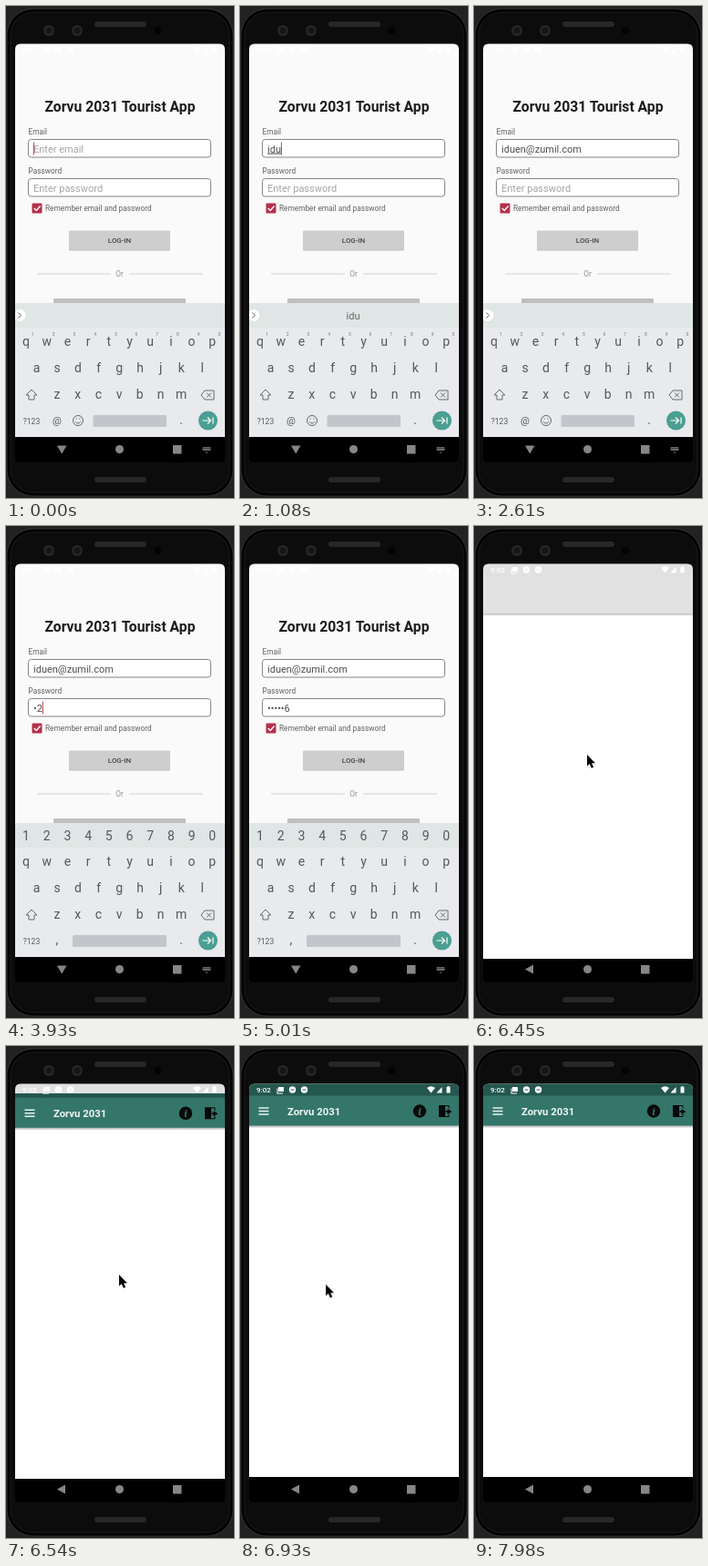
These frames come from a looping animation (250x540 px, 8 s). An HTML page:

```html
<!DOCTYPE html>
<html lang="en">
<head>
<meta charset="utf-8">
<title>Phone login</title>
<style>
  html, body { margin: 0; height: 100%; overflow: hidden; background: #222; }
  svg { display: block; width: 100vw; height: 100vh; font-family: Roboto, sans-serif; }
  .mid { text-anchor: middle; }
  .label { font-size: 8.3px; fill: #626262; }
  .field { fill: #fff; stroke: #858585; }
  .entry { font-size: 11px; fill: #505050; }
  .key { font-size: 14px; fill: #55585b; text-anchor: middle; }
  .hint { font-size: 5px; fill: #777; text-anchor: middle; }
  .line { fill: none; stroke: #66696c; }

  #pointer, #reveal, #home, #dim, .typing-nav, .home-nav { animation: 8s infinite; }
  #pointer { animation-name: pointer; }
  #reveal { animation-name: reveal; transform-origin: 0 475px; }
  #home { animation-name: rise; }
  #dim { animation-name: dim; }
  .typing-nav { animation-name: vanish; animation-timing-function: step-end; }
  .home-nav { animation-name: appear; animation-timing-function: step-end; }

  @keyframes pointer {
    0%, 66.4% { transform: translate(104px, 230px); opacity: 0; animation-timing-function: step-end; }
    66.5% { transform: translate(104px, 230px); opacity: 1; animation-timing-function: ease-in-out; }
    71%, 84.375% { transform: translate(124px, 251px); opacity: 1; animation-timing-function: ease-in; }
    90%, 100% { transform: translate(-14px, 300px); opacity: 1; }
  }
  @keyframes reveal {
    0%, 78% { transform: scaleY(0); animation-timing-function: cubic-bezier(0, 0, .2, 1); }
    82.8%, 100% { transform: scaleY(1); }
  }
  @keyframes rise {
    0%, 78% { transform: translateY(32px); animation-timing-function: ease-out; }
    82.8%, 100% { transform: none; }
  }
  @keyframes dim {
    0%, 78% { opacity: 0; }
    81%, 100% { opacity: .1; }
  }
  @keyframes vanish { 0% { opacity: 1; } 79.5%, 100% { opacity: 0; } }
  @keyframes appear { 0% { opacity: 0; } 79.5%, 100% { opacity: 1; } }
</style>
</head>
<body>
<svg viewBox="0 0 250 540" preserveAspectRatio="none">
  <defs>
    <clipPath id="screen"><path d="M10 500V47.5q0-6 6-6H234q6 0 6 6V500Z"/></clipPath>
    <clipPath id="revealed"><rect id="reveal" x="10" y="41" width="230" height="434"/></clipPath>
    <linearGradient id="shade" x2="0" y2="1">
      <stop stop-color="#000" stop-opacity=".3"/><stop offset="1" stop-color="#000" stop-opacity="0"/>
    </linearGradient>
  </defs>

  <!-- Handset -->
  <rect width="250" height="540" fill="#222"/>
  <rect x="1" y="3" width="248" height="535" rx="29" fill="#030303" stroke="#353535"/>
  <rect x="5" y="7" width="240" height="527" rx="25" fill="#0c0c0c" stroke="#1c1c1c"/>
  <g fill="#272727">
    <rect x="97" y="17" width="57" height="6" rx="3"/>
    <rect x="97" y="517" width="57" height="6" rx="3"/>
    <circle cx="47" cy="27" r="6"/><circle cx="78" cy="27" r="6"/>
  </g>
  <g fill="#161616"><circle cx="47" cy="27" r="3.5"/><circle cx="78" cy="27" r="3.5"/></g>
  <circle cx="166" cy="27" r="4" fill="#030303"/>
  <rect x="10" y="470" width="230" height="31" rx="5" fill="#000"/>

  <g clip-path="url(#screen)">
    <!-- Login -->
    <rect x="10" y="41" width="230" height="432" fill="#fafafa"/>
    <text class="mid" x="125" y="115.5" font-size="15.7" font-weight="700" fill="#1c1c1c">Zorvu 2031 Tourist App</text>
    <text class="label" x="24.5" y="140.5">Email</text>
    <rect class="field" x="24.5" y="146.5" width="200" height="19.5" rx="3"/>
    <text class="label" x="24.5" y="183.5">Password</text>
    <rect class="field" x="24.5" y="189.5" width="200" height="19.5" rx="3"/>
    <text class="entry" id="email" x="30" y="160.5"></text>
    <text class="entry" id="password" x="30" y="203.5"></text>
    <rect id="caret" width="1" height="14" fill="#c8404f"/>
    <rect x="28.5" y="216.5" width="11" height="11" rx="1" fill="#b52f4c"/>
    <path d="M30.8 222l2.5 2.5 4.3-5" fill="none" stroke="#fff" stroke-width="1.4"/>
    <text class="label" x="43" y="225">Remember email and password</text>
    <rect x="69" y="247" width="111" height="21.5" rx="1" fill="#c2c2c2"/>
    <rect x="69" y="246.500" width="111" height="21" rx="1" fill="#cecece"/>
    <text class="mid" x="124.5" y="260" font-size="7.9" font-weight="500" fill="#444">LOG-IN</text>
    <path d="M34 294H115M135 294H216" stroke="#d2d2d2"/>
    <text class="label mid" x="124.5" y="297" style="fill:#909090">Or</text>
    <rect x="52" y="321" width="145" height="6" rx="1" fill="#bfbfbf"/>

    <!-- Keyboard -->
    <rect x="10" y="326" width="230" height="147" fill="#e8eaed"/>
    <rect x="10" y="326" width="230" height="27" fill="#dfe6e5"/>
    <g id="keys"></g>
    <path class="line" d="M28 421l6 6h-3v5h-6v-5h-3Z"/>
    <path class="line" d="M214 427l4-5h10v10h-10Zm6-2.5l5 5m0-5l-5 5"/>
    <text class="key" x="28" y="458.5" style="font-size:8.5px">?123</text>
    <text class="key" x="192" y="459">.</text>
    <circle cx="221.500" cy="455" r="10.500" fill="#4a9f92"/>
    <path d="M215.500 455h9m-3.500-3.500l3.500 3.500-3.500 3.500M227 451.500v7" fill="none" stroke="#fff" stroke-width="1.2"/>
    <g id="emailKeys">
      <circle cx="15" cy="339.5" r="6.5" fill="#fff"/>
      <path class="line" d="M13.5 336.5l3 3-3 3"/>
      <text class="mid" id="suggestion" x="124" y="344" font-size="11" fill="#666"></text>
      <text class="key" x="56" y="459" style="font-size:11px">@</text>
      <circle class="line" cx="79" cy="455" r="5.5"/>
      <path class="line" d="M76 456q3 4 6 0M76.5 453h1.2M80.3 453h1.2"/>
      <rect x="95.5" y="449" width="80.5" height="13" rx="1.5" fill="#c2c6ca"/>
    </g>
    <g id="passwordKeys">
      <text class="key" x="56" y="459">,</text>
      <rect x="73" y="449" width="103" height="13" rx="1.5" fill="#c2c6ca"/>
    </g>
    <rect id="dim" x="10" y="41" width="230" height="432"/>

    <!-- Home -->
    <g clip-path="url(#revealed)"><g id="home">
      <rect x="10" y="41" width="230" height="432" fill="#fff"/>
      <rect x="10" y="41" width="230" height="14" fill="#24574e"/>
      <rect x="10" y="54.5" width="230" height="33" fill="#34766a"/>
      <rect x="10" y="87.5" width="230" height="3" fill="url(#shade)"/>
      <path d="M20.5 68h11M20.5 71.5h11M20.5 75h11" stroke="#e8f2ef" stroke-width="1.4"/>
      <text x="52" y="76" font-size="11.3" font-weight="700" fill="#eef5f3">Zorvu 2031</text>
      <circle cx="197" cy="71.5" r="7.2" fill="#090909"/>
      <text class="mid" x="197" y="75.5" font-family="Noto Serif, serif" font-size="11" font-weight="700" font-style="italic" fill="#34766a">i</text>
      <path d="M218 65h7v13h-7ZM227.500 69l5 3-5 3v-2h-2v-2h2Z" fill="#090909"/>
      <path d="M225 65.5h4v3M225 77.5h4v-3" fill="none" stroke="#090909"/>
    </g></g>

    <!-- Status bar -->
    <g fill="#fff" fill-rule="evenodd">
      <text x="18" y="50.5" font-size="8" font-weight="500">9:02</text>
      <path d="M42 45h6v5h-6ZM40.5 46.5h1v5h5.5v1h-6.5Z"/>
      <path id="badge" d="M53.8 48a3.7 3.7 0 1 0 7.4 0a3.7 3.7 0 1 0-7.4 0Zm1.700-.5h4v1h-4Z"/>
      <use href="#badge" x="13"/>
      <path d="M205 46q4.5-3.5 9 0l-4.5 5.5ZM215.5 51.5l6-6.5v6.5ZM226.5 45h1v-1h2v1h1v6.5h-4Z"/>
    </g>
  </g>

  <!-- Navigation -->
  <g fill="#868686">
    <path class="typing-nav" d="M56 482.5h10.5l-5.25 9Z"/>
    <path class="home-nav" d="M65 481.5v10l-9-5Z"/>
    <circle cx="124.5" cy="486.5" r="4.5"/>
    <rect x="183" y="482" width="9.5" height="9.5"/>
    <g class="typing-nav" fill="#6a6a6a">
      <rect x="215.5" y="484" width="9" height="4" rx="1"/>
      <path d="M218 489.500h4l-2 1.500Z"/>
      <path d="M216.5 485.5h7" stroke="#000" stroke-width=".8" stroke-dasharray="1"/>
    </g>
  </g>

  <path id="pointer" d="M0 0V12.5l2.8-2.5 2 4.800 2.300-1-2-4.600H9Z" fill="#050505" stroke="#fff" stroke-width="1.2" paint-order="stroke"/>
</svg>

<script>
const LOOP = 8000;
const MASK_DELAY = 1500;
const FOCUS_LEFT = 2550, FOCUS_PASSWORD = 2640, KEYBOARD_SWITCH = 2760;
const ADDRESS = "iduen@zumil.com";
const CODE = "123456";
const addressTimes = [870, 960, 1050, 1140, 1230, 1410,
  ...Array.from({ length: 9 }, (_, i) => 1680 + i * 87)];
const codeTimes = [3700, 3870, 4000, 4100, 4200, 4290];

const $ = id => document.getElementById(id);
const [email, password, caret, suggestion, pointer] =
  ["email", "password", "caret", "suggestion", "pointer"].map($);
const svgNode = name => document.createElementNS("http://www.w3.org/2000/svg", name);

function addRow(parent, cls, letters, x, y) {
  [...letters].forEach((letter, i) => {
    const node = svgNode("text");
    node.setAttribute("class", cls);
    node.setAttribute("x", x + i * 22.7);
    node.setAttribute("y", y);
    node.textContent = letter;
    parent.append(node);
  });
}

addRow($("keys"), "key", "qwertyuiop", 22, 372.5);
addRow($("keys"), "key", "asdfghjkl", 33.5, 401.5);
addRow($("keys"), "key", "zxcvbnm", 56, 431);
addRow($("emailKeys"), "hint", "1234567890", 29.5, 362);
addRow($("passwordKeys"), "key", "1234567890", 22, 345);

const typedCount = (times, t) => times.filter(time => time <= t).length;

function showEntry(node, value, hint) {
  node.textContent = value || hint;
  node.style.fill = value ? "" : "#a5a5a5";
}

function draw(t) {
  const address = ADDRESS.slice(0, typedCount(addressTimes, t));
  const digits = typedCount(codeTimes, t);
  const onEmail = t < FOCUS_LEFT;
  const onPassword = t >= FOCUS_PASSWORD;

  // The word being composed is underlined and offered as a suggestion.
  const word = onEmail ? address.match(/[a-z]*$/)[0] : "";
  showEntry(email, address, "Enter email");
  if (word) {
    const span = svgNode("tspan");
    span.setAttribute("text-decoration", "underline");
    span.textContent = word;
    email.textContent = address.slice(0, -word.length);
    email.append(span);
  }
  suggestion.textContent = word;

  let secret = "•".repeat(digits);
  if (digits && t - codeTimes[digits - 1] < MASK_DELAY)
    secret = secret.slice(1) + CODE[digits - 1];
  showEntry(password, secret, "Enter password");

  const lastEdit = onEmail
    ? addressTimes[address.length - 1] ?? -280
    : codeTimes[digits - 1] ?? FOCUS_PASSWORD;
  const blinkOn = (t - lastEdit) % 1000 < 500;
  const [node, value] = onEmail ? [email, address] : [password, secret];
  caret.setAttribute("x", 30 + (value ? node.getComputedTextLength() : 0));
  caret.setAttribute("y", onEmail ? 149.5 : 192.5);
  caret.style.opacity = (onEmail || onPassword) && blinkOn ? 1 : 0;

  const numeric = t >= KEYBOARD_SWITCH;
  $("emailKeys").style.display = numeric ? "none" : "";
  $("passwordKeys").style.display = numeric ? "" : "none";
}

// Typing shares the clock of the CSS animations.
const clock = pointer.getAnimations()[0];
function tick() {
  draw((clock.currentTime || 0) % LOOP);
  requestAnimationFrame(tick);
}
tick();
</script>
</body>
</html>
```
